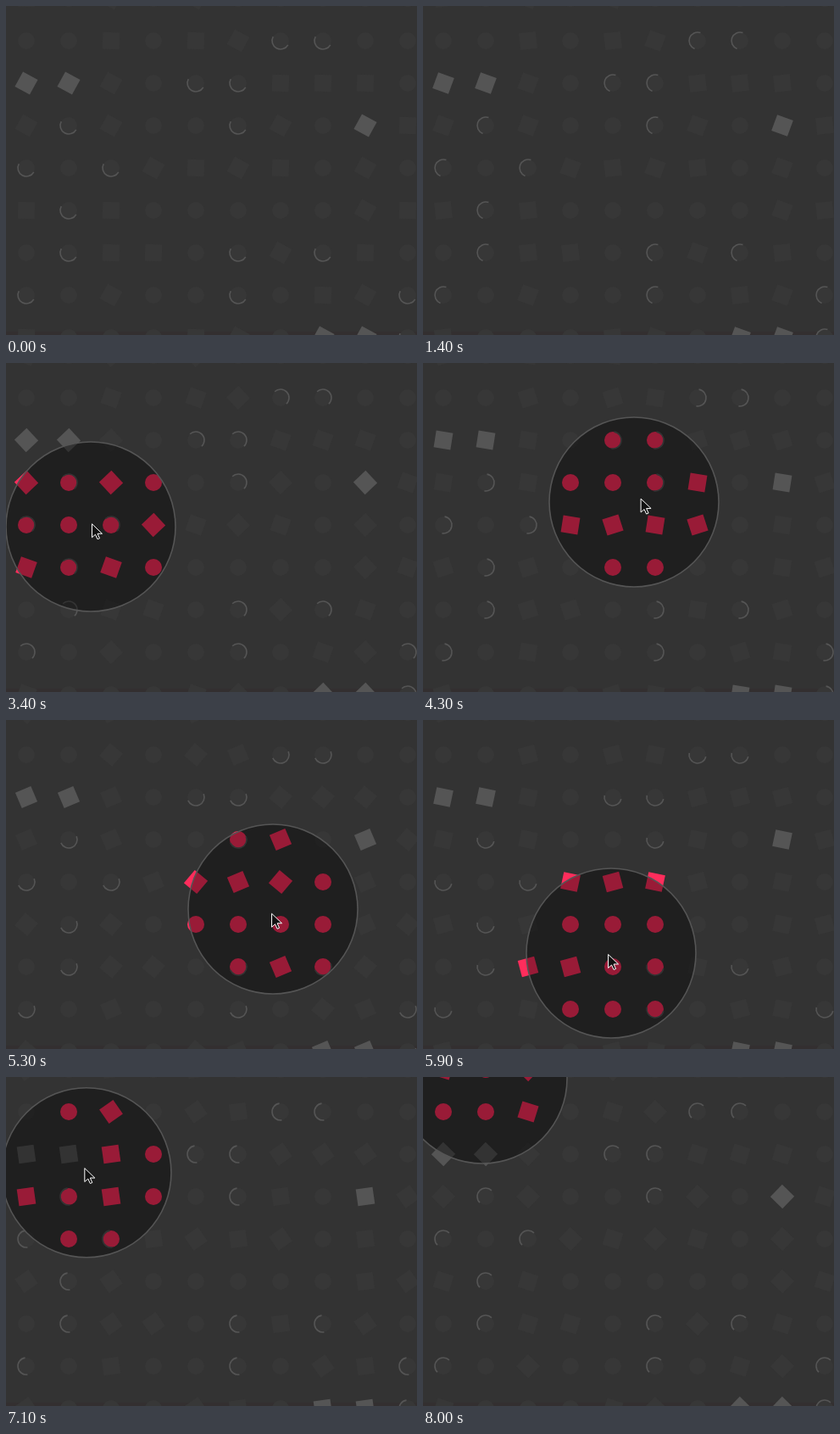
Write an HTML page with a canvas that moves like this. It is 485x388 px and loops after 8100 ms.

```html
<!DOCTYPE html>
<html>
<head>
<meta charset="utf-8">
<style>
html, body { margin: 0; width: 100%; height: 100%; overflow: hidden; background: #333; }
canvas { display: block; width: 485px; height: 388px; }
</style>
</head>
<body>
<canvas id="stage" width="485" height="388"></canvas>
<script>
const ctx = document.getElementById('stage').getContext('2d');
const LOOP = 8100, STEP = 100, LEAD = 30, RADIUS = 100, RAD = Math.PI / 180;
const POINTER = new Path2D('M0 0V16L4 12.5 6.5 18 9 17 6.5 11.5H12Z');

// c dot, s dot with half ring, a/b squares in two phases, l light square
const GRID = [
  'bcacaccccc',
  'ccbcbasscc',
  'llacssbbbc',
  'asaccsaclb',
  'scsababcac',
  'bsbcccccab',
  'csbbcsasbc',
  'scaccscbas',
  'bcccbaclls'
];

// lens key points: time, x, y
const PATH = [
  [2300, -250, 100],
  [2600, -51, 152],
  [3000, 80, 210],
  [3400, 100, 193],
  [3800, 115, 125],
  [4300, 249, 164],
  [4600, 285, 80],
  [5300, 315, 223],
  [5900, 222, 275],
  [6400, 176, 255],
  [7200, 87, 95],
  [8000, 70, 2],
  [8200, 65, -150]
];

function spline(a, b, c, d, u) {
  return b + u / 2 * (c - a + u * (2 * a - 5 * b + 4 * c - d + u * (3 * (b - c) + d - a)));
}

function lensAt(t) {
  const i = PATH.findIndex(p => p[0] > t);
  const q = PATH[i - 1], r = PATH[i];
  if (!q) return PATH[0].slice(1);
  const p = PATH[i - 2] || q, s = PATH[i + 1] || r;
  const u = (t - q[0]) / (r[0] - q[0]);
  return [1, 2].map(k => spline(p[k], q[k], r[k], s[k], u));
}

function disc(x, y, r, color) {
  ctx.fillStyle = color;
  ctx.beginPath();
  ctx.arc(x, y, r, 0, 2 * Math.PI);
  ctx.fill();
}

function halfRing(x, y, angle) {
  ctx.beginPath();
  ctx.arc(x, y, 10, angle - Math.PI, angle);
  ctx.stroke();
}

function square(x, y, angle, color) {
  ctx.save();
  ctx.translate(x, y);
  ctx.rotate(angle);
  ctx.fillStyle = color;
  ctx.fillRect(-10, -10, 20, 20);
  ctx.restore();
}

function pointer(x, y) {
  ctx.save();
  ctx.translate(x + 0.5, y + 0.5);
  ctx.fillStyle = '#111';
  ctx.fill(POINTER);
  ctx.strokeStyle = '#fff';
  ctx.lineWidth = 1;
  ctx.stroke(POINTER);
  ctx.restore();
}

function draw(t) {
  const spin = (t - 2600) * 0.0582 * RAD;
  const [lx, ly] = lensAt(t);
  ctx.fillStyle = '#333';
  ctx.fillRect(0, 0, 485, 388);
  ctx.fillStyle = '#332f30';
  ctx.fillRect(0, 384, 485, 4);
  ctx.strokeStyle = '#555';
  ctx.lineWidth = 1.6;

  GRID.forEach((row, j) => [...row].forEach((kind, i) => {
    const x = 24 + 50 * i, y = 50 * j - 9;
    const near = Math.hypot(x - lx, y - ly) < RADIUS;
    const color = kind === 'l' ? '#555' : near ? '#ff2d5c' : '#373737';
    if ('cs'.includes(kind)) disc(x, y, 10, color);
    else square(x, y, kind === 'b' ? spin - 27 * RAD : spin, color);
    if (kind === 's') halfRing(x, y, spin);
  }));

  disc(lx, ly, RADIUS, 'rgba(0,0,0,.4)');
  ctx.stroke();
  pointer(...lensAt(t + LEAD));
}

const start = performance.now();
function frame() {
  const t = (performance.now() - start) % LOOP;
  draw(Math.floor(t / STEP) * STEP);
  requestAnimationFrame(frame);
}
frame();
</script>
</body>
</html>
```
